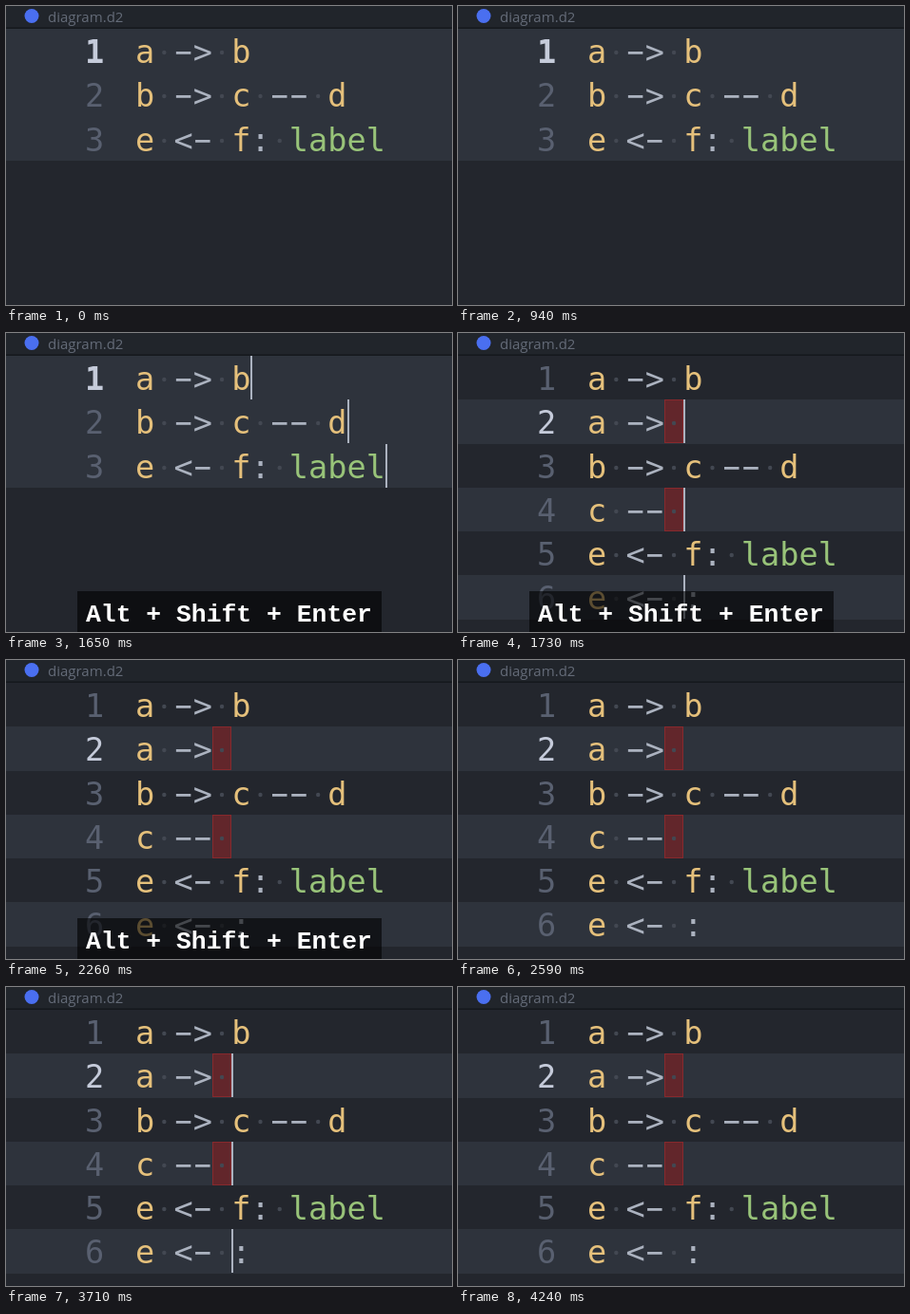
An HTML page with a canvas that plays this animation: 469x315 px, repeating every 4.37 s.

```html
<!DOCTYPE html>
<html lang="en">
<head>
<meta charset="utf-8">
<title>diagram.d2</title>
<style>
  html, body { margin: 0; width: 100%; height: 100%; overflow: hidden; background: #23262d; }
  canvas { display: block; }
</style>
</head>
<body>
<canvas id="stage" width="469" height="315"></canvas>
<script>
const ctx = document.getElementById('stage').getContext('2d');
const LOOP = 4370, TOP = 24, ROW = 46.25, LEFT = 136, CELL = 20.23;
const CODE_FONT = '33.6px "DejaVu Sans Mono", monospace';

const before = { lines: ['a -> b', 'b -> c -- d', 'e <- f: label'], lit: [0, 1, 2], active: 0 };
const after = {
  lines: ['a -> b', 'a -> ', 'b -> c -- d', 'c -- ', 'e <- f: label', 'e <- :'],
  lit: [1, 3, 5], active: 1, errors: [1, 3]
};

// Carets are visible within these spans of the loop.
const caretSpans = [[470, 940], [1450, 2260], [2720, 3250], [3710, 4240]];
const within = (t, [start, end]) => t >= start && t < end;

const rowTop = row => Math.round(TOP + row * ROW);
const colX = col => Math.round(LEFT + col * CELL);

function rect(color, x, y, w, h) {
  ctx.fillStyle = color;
  ctx.fillRect(x, y, w, h);
}

function text(string, x, y, color, font) {
  ctx.font = font;
  ctx.fillStyle = color;
  ctx.fillText(string, x, y);
}

function drawChar(char, col, baseline, isLabel) {
  const x = LEFT + col * CELL;
  if (char === ' ') {
    ctx.fillStyle = '#434852';
    ctx.beginPath();
    ctx.arc(x + CELL / 2, baseline - 11, 2.2, 0, 7);
    ctx.fill();
  } else if (char === '-') {
    rect('#abb2bf', x + 2.4, baseline - 12, 15.5, 2.8);
  } else {
    const color = '<>:'.includes(char) ? '#abb2bf' : isLabel ? '#98c379' : '#e5c07b';
    text(char, x, baseline, color, CODE_FONT);
  }
}

function drawEditor({ lines, lit, active, errors = [] }, caretsOn) {
  for (const row of lit) rect('#2e333c', 0, rowTop(row), 469, rowTop(row + 1) - rowTop(row));
  lines.forEach((line, row) => {
    const top = rowTop(row), baseline = top + 36;
    const bold = row === active && active === 0 ? 'bold ' : '';
    text(row + 1, 83, baseline, row === active ? '#c5cbda' : '#596070', bold + CODE_FONT);
    if (errors.includes(row)) {
      rect('#62262b', 217, top, 20, 46);
      ctx.strokeStyle = '#87292d';
      ctx.strokeRect(217.5, top + .5, 19, 45);
    }
    const labelStart = line.includes('label') ? line.indexOf('label') : Infinity;
    [...line].forEach((char, col) => drawChar(char, col, baseline, col >= labelStart));
    if (caretsOn && lit.includes(row)) {
      const col = lines === after.lines ? 5 : line.length;
      rect('#abb2bf', colX(col), top, 2, 46);
    }
  });
}

function drawTab() {
  rect('#21252b', 0, 0, 469, 23);
  rect('#15181c', 0, 22.5, 469, 1.5);
  ctx.fillStyle = '#4a6ff0';
  ctx.beginPath();
  ctx.arc(27, 10.5, 7.5, 0, 7);
  ctx.fill();
  text('diagram.d2', 44, 17, '#646b78', '15px "Open Sans", "Noto Sans", sans-serif');
}

function drawKeys() {
  rect('rgba(0, 0, 0, .6)', 75, 272, 320, 43);
  text('Alt + Shift + Enter', 84, 304, '#fff', 'bold 26.4px "Liberation Mono", monospace');
}

function draw(now) {
  const t = now % LOOP;
  rect('#23262d', 0, 0, 469, 315);
  drawEditor(t < 1730 ? before : after, caretSpans.some(span => within(t, span)));
  drawTab();
  if (within(t, [1650, 2590])) drawKeys();
  requestAnimationFrame(draw);
}
requestAnimationFrame(draw);
</script>
</body>
</html>
```
